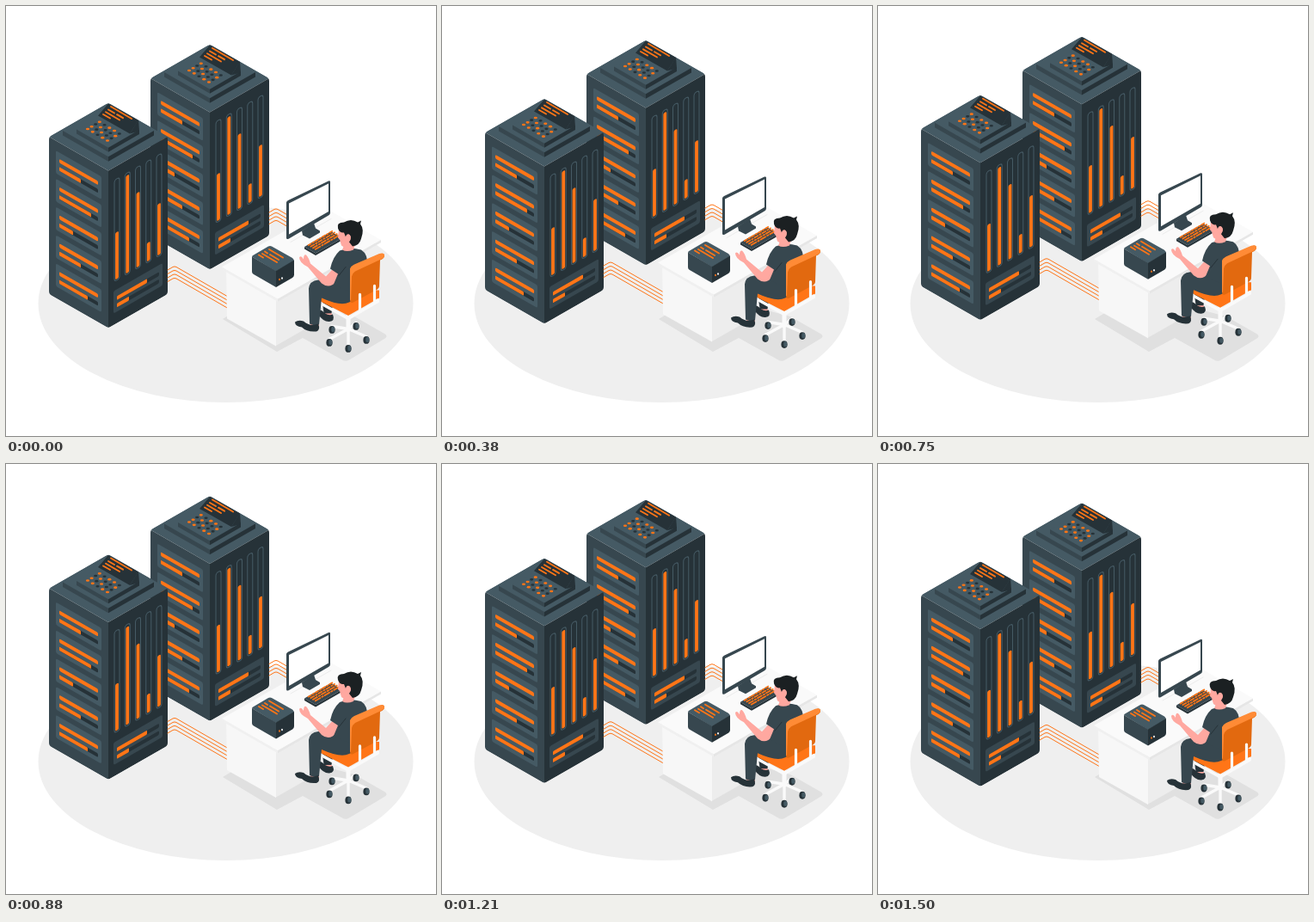
Animation of 500 by 500 pixels, one loop 1.54 s. Source, as an HTML page:

```html
<!DOCTYPE html>
<html lang="en">
<head>
<meta charset="utf-8">
<title>Server room</title>
<style>
  html, body { margin: 0; height: 100%; overflow: hidden; background: #fff; }
  svg { display: block; width: 100vw; height: 100vh; }
</style>
</head>
<body>
<svg viewBox="0 0 500 500">
  <clipPath id="rackShape">
    <path d="M50 156Q50 152.500 53 150.800L116 114.600Q119 112.800 122 114.600L185 150.800Q188 152.500 188 156V332Q188 335.500 185 337.200L122 373.400Q119 375.200 116 373.400L53 337.200Q50 335.500 50 332Z"/>
  </clipPath>
  <ellipse cx="255.500" cy="346" rx="218" ry="115" fill="#efefef"/>
  <path d="M252 364L315 402L345 386L391 411.500Q395 414 399 411.500L440 387Q445 384 440 381L405 361L352 347L300 335Z" fill="#e0e0e0"/>
  <g id="scene"></g>
</svg>
<script>
const LOOP = 1540, LIFT = 10, PHASE = 40, SLOPE = 0.572;
const ORANGE = '#ff7517', DARK = '#263238', MID = '#37474f', LIGHT = '#455a64', SKIN = '#ffa8a0';

const path = (d, fill) => `<path d="${d}" fill="${fill}"/>`;
const poly = (fill, ...p) => `<polygon points="${p.join(' ')}" fill="${fill}"/>`;
const line = (d, color, width, extra = '') =>
  `<path d="${d}" fill="none" stroke="${color}" stroke-width="${width}" stroke-linecap="round" stroke-linejoin="round" ${extra}/>`;
const rect = (x, y, w, h, fill, r = 1, extra = '') =>
  `<rect x="${x}" y="${y}" width="${w}" height="${h}" rx="${r}" fill="${fill}" ${extra}/>`;
const oval = (x, y, rx, ry, fill) => `<ellipse cx="${x}" cy="${y}" rx="${rx}" ry="${ry}" fill="${fill}"/>`;
const skew = (x, y, slope, content) => `<g transform="matrix(1 ${slope} 0 1 ${x} ${y})">${content}</g>`;

// Isometric box from its left top corner: a runs down-right, b up-right.
function box(x, y, a, b, h, top, left, right) {
  const fx = x + a, fy = y + a * SLOPE, rx = fx + b, ry = fy - b * SLOPE;
  return poly(top, x, y, fx, fy, rx, ry, x + b, y - b * SLOPE) +
    poly(left, x, y, fx, fy, fx, fy + h, x, y + h) +
    poly(right, fx, fy, rx, ry, rx, ry + h, fx, fy + h);
}

function drawerFace() {
  return [37, 49, 28, 37, 45].map((end, i) => {
    const y = i * 32.8;
    return rect(8, y + 11.5, 53, 26.5, LIGHT, 2) +
      rect(12, y + 19, 45, 4.6, ORANGE, 1.5) +
      rect(12, y + 28.3, 45, 4.6, DARK, 1.5) +
      rect(12, y + 28.3, end - 12, 4.6, ORANGE);
  }).join('');
}

function meterFace() {
  const meters = [77, 18, 45, 110, 72].map((top, i) => {
    const x = 10 + i * 12.25;
    return rect(x - 3, 15, 6, 118, DARK, 3, `stroke="${LIGHT}"`) +
      rect(x - 1.9, top, 3.8, 131.5 - top, ORANGE, 1.5);
  }).join('');
  return meters + rect(6, 143.5, 57, 26, MID, 2) +
    rect(10, 151.5, 49, 4.6, DARK, 1.5) + rect(10, 151.5, 35, 4.6, ORANGE) +
    rect(10, 160, 49, 4.6, DARK, 1.5) + rect(10, 160, 14, 4.6, ORANGE);
}

function console3d() {
  const lit = ['1101', '1010', '0101', '1001', '1010'];
  const keys = lit.map((row, r) => [...row].map((on, c) =>
    oval(95 + r * 5.75 + c * 4.6, 143.5 + r * 3.4 - c * 2.7, 2.1, 1.3, +on ? ORANGE : DARK)).join('')).join('');
  return box(66, 145.5, 53, 53, 5.5, LIGHT, MID, DARK) +
    box(82, 144, 37, 36, 5, LIGHT, MID, DARK) + keys +
    poly(DARK, 144, 149, 154, 133, 155, 146) +
    poly(DARK, 107, 128, 119, 114, 154, 133.5, 144, 149) +
    line('M122 117.500L146 131.500M119 121L126 125M129 126.700L136 130.700M116 123.800L132 133M113 126.500L121 131', ORANGE, 1.9);
}

function rack(dx, dy) {
  return `<g transform="translate(${dx} ${dy})"><g clip-path="url(#rackShape)">` +
    box(50, 152.5, 69, 69, 183, LIGHT, MID, DARK) +
    skew(50, 152.5, SLOPE, drawerFace()) + skew(119, 192, -SLOPE, meterFace()) +
    '</g>' + console3d() + '</g>';
}

const cables = (x, y, len) => [0, 1, 2, 3].map(i =>
  line(`M${x} ${y + i * 4.5}l6 -3.500q2 -1 4 0l${len} ${len * 0.575}`, ORANGE, 1)).join('');

function desk() {
  const keyRows = [0, 1, 2, 3].map(i =>
    line(`M${351 + i * 2.7} ${279 + i * 1.6}l29 -17`, ORANGE, 1.8,
      `style="stroke-linecap:butt" stroke-dasharray="${5 + i} .8 3 .7"`)).join('');
  return poly('#ededed', 313, 340, 362, 312, 362, 368, 313, 396) +
    poly('#f7f7f7', 256, 306, 314, 340, 314, 396, 257, 364) +
    box(251, 304, 65, 120, 3, '#fafafa', '#f0f0f0', '#e6e6e6') +
    line('M331 275L378 248', '#ececec', 1) +
    // monitor
    path('M344 262L358 253L360 259L365 262V264L353 271L345 267Z', MID) +
    path('M326 229Q326 227.500 328 226.500L375 204Q377 203.500 377 205V241Q377 243 375 244L329 271Q326 272.500 326 270Z', MID) +
    poly('#fff', 329, 230, 375, 207, 375, 239.5, 329, 266) +
    // keyboard
    box(347, 280.5, 13, 31, 2.5, MID, DARK, DARK) + keyRows +
    // desktop unit
    path('M286 292Q286 291 288 290L305 280Q307 279 309 280L333 293.500Q335 295 335 297L314 309Z', LIGHT) +
    path('M286 292L314 308.500V327.500L288 312.500Q286 311.500 286 309.500Z', MID) +
    path('M314 308.500L335 296V313Q335 315 333 316.500L314 327.500Z', DARK) +
    line('M306 283.500L322 293M301 286L304 288M307 289.500L317 295.500M298 288.500L315 298.500M294 290L299 293', ORANGE, 1.9) +
    oval(318, 318.5, .9, 1.3, ORANGE) + oval(321, 317, .9, 1.3, '#fff');
}

function chairBase() {
  const wheels = [[379, 377], [407, 373], [376, 392], [398, 399], [419, 389]];
  return wheels.map(([x, y]) =>
    line(`M398 376L${x} ${y - 4}`, '#fafafa', 3.4) +
    oval(x, y, 3.6, 4.4, DARK) + oval(x + 1.3, y - .4, 2, 3.2, LIGHT)).join('') +
    line('M398 358V377', '#fafafa', 5);
}

function person() {
  return path('M367 338L381 341L378 361L370 361Z', DARK) +
    path('M371 358H379V364H371Z', SKIN) +
    path('M363 354Q366 353 371 358Q376 361 380 359Q383 367 376 367.500Q369 368 363 359Z', DARK) +
    // seat
    path('M362 342L398 362L434 341V345L398 366L362 346Z', '#fafafa') +
    path('M362 340L381 330L434 331V340L398 360.500L362 342Z', ORANGE) +
    // front leg
    path('M354 368H364V374H354Z', SKIN) +
    path('M352 329Q353 320 363 319L383 317L408 328Q411 340 399 345Q389 350 367 340L364 371Q358 373 353 370Z', MID) +
    path('M336 368Q340 365 346 367Q354 374 363 370Q366 377 361 379Q350 380 344 374Q336 373 336 368Z', DARK) +
    // arm and torso
    path('M382 304L393 309L384 321Q376 330 367 323L351 304Q341 299 341 293Q343 290 346 295Q346 289 349 290Q352 293 354 300L372 315Z', SKIN) +
    path('M388 285Q399 280 413 284Q421 289 420 302L408 334Q394 332 381 324L386 312L377 306Q380 292 388 285Z', MID) +
    line('M395 304L387 314', DARK, 1) +
    // head
    path('M395 274L406 278L404 284Q396 287 391 284Z', SKIN) +
    path('M387 260L399 258L406 268L402 278Q396 284 390 279L388 272L386 270Z', SKIN) +
    path('M386 259Q384 252 393 252Q401 247 409 252L413 250L412 254Q417 260 413 271Q411 279 403 280L399 275Q403 269 399 266Q396 265 395 269L393 264Q388 265 386 259Z', '#1b2022') +
    oval(398, 270, 2.6, 3.8, SKIN);
}

function chairBack() {
  return path('M400 309Q400 304 404 302L435 289Q440 287 440 291Q440 294 435 296L434 326Q434 329 430 331L404 345Q400 347 400 342Z', '#e2690f') +
    path('M400 306Q401 303 405 301L434 288.500Q440 287 440 291Q440 293 436 295L406 309Q403 311 402 315L401 343Q400 343 400 341Z', '#ff8b36') +
    line('M411.500 336V355M428.500 326V346', '#fafafa', 3.2) +
    line('M428.500 345L432 342', '#fafafa', 2.5);
}

const scene = document.getElementById('scene');
scene.innerHTML = rack(118, -68) + cables(306, 240.5, 40) + rack(0, 0) + cables(188, 307.5, 66) +
  desk() + chairBase() + person() + chairBack();

function draw() {
  const p = (performance.now() + PHASE) % LOOP / LOOP;
  const y = -LIFT * (1 - Math.abs(1 - 2 * p));
  scene.setAttribute('transform', `translate(0 ${y.toFixed(3)})`);
  requestAnimationFrame(draw);
}
draw();
</script>
</body>
</html>
```
